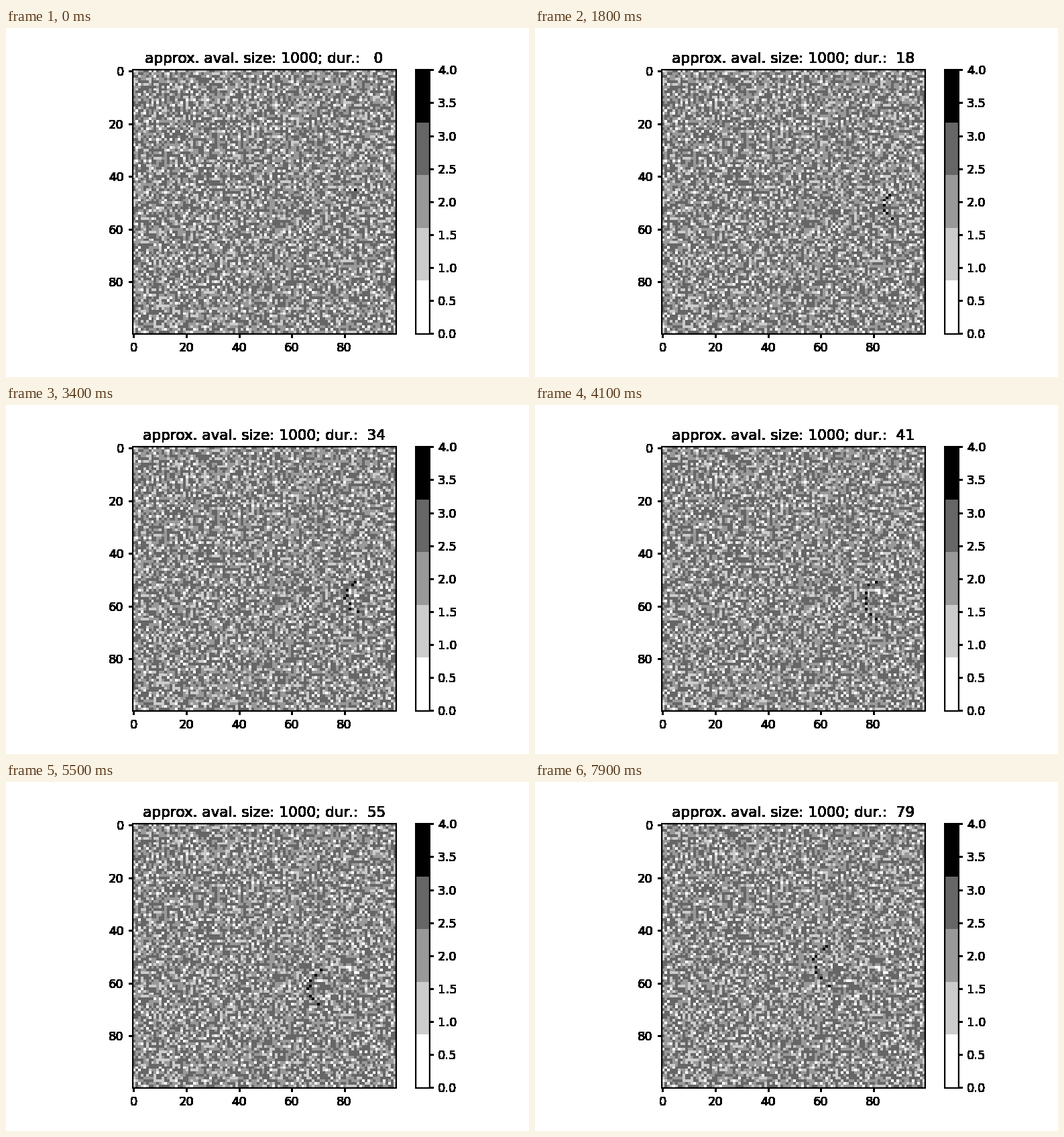
A matplotlib script for the animation above (8 s loop, 780x520 px).

```python
import numpy as np
import matplotlib.pyplot as plt
from matplotlib.animation import FuncAnimation
from matplotlib.colors import ListedColormap
from matplotlib.patches import Rectangle

SIZE, STEPS, DPI = 100, 80, 130
WALKERS = 8
rng = np.random.default_rng(12)


def spread(sites):
    """Grains each cell receives from its toppling neighbours."""
    p = np.pad(sites.astype(int), 1)
    return p[:-2, 1:-1] + p[2:, 1:-1] + p[1:-1, :-2] + p[1:-1, 2:]


def critical_pile():
    pile = rng.integers(1, 6, (SIZE, SIZE))
    while (hot := pile > 3).any():
        pile += spread(hot) - 4 * hot
    return pile


def front(t, u):
    """Point u in [-1, 1] along the bowed wave front at step t."""
    keys = [0, 11, 26, 41, 55, 66, 79]
    x = np.interp(t, keys, [84, 82, 86, 76, 66, 62, 57])
    y = np.interp(t, keys, [45, 48, 55, 58, 62, 60, 53])
    half = np.interp(t, keys, [0, 4, 5, 7, 6, 8, 8])
    return x + 0.65 * half * u * u, y + half * u


def step(pos, goal):
    """One lattice step towards goal, slightly jittered."""
    x, y = pos
    near = [(x + 1, y), (x - 1, y), (x, y + 1), (x, y - 1)]
    return min(near, key=lambda p: np.hypot(p[0] - goal[0], p[1] - goal[1])
               + 0.8 * rng.random())


def avalanche():
    pile, frames = critical_pile(), []
    stock = pile.ravel().copy()
    walkers = [(84, 45)] * WALKERS
    lanes = np.linspace(-1, 1, WALKERS)
    for t in range(STEPS):
        if t:
            walkers = [step(p, front(t, u)) for p, u in zip(walkers, lanes)]
        x, y = np.transpose(walkers)
        frame = pile.copy()
        frame[y, x] = 4
        frames.append(frame)
        pile[y, x] = rng.choice(stock, WALKERS)
    return frames


def crisp(img, dpi):
    """Hard-edged ink: every touched pixel becomes solid."""
    img[..., 3] = img[..., 3] > 0
    return img, 0, 0


frames = avalanche()
plt.rcParams["font.family"] = "DejaVu Sans"
fig, ax = plt.subplots(figsize=(6, 4), dpi=DPI, facecolor="white")
fig.subplots_adjust(left=0.125, right=0.9, bottom=0.125, top=0.88)
cmap = ListedColormap(["#ffffff", "#cccccc", "#999999", "#666666", "#000000"])
image = ax.imshow(frames[0], cmap=cmap, vmin=0, vmax=4,
                  interpolation="nearest")
bar = fig.colorbar(image, ax=ax, ticks=np.arange(0, 4.1, 0.5))
ax.set_xticks(range(0, SIZE, 20))
ax.set_yticks(range(0, SIZE, 20))
title = ax.set_title("")

for art in (ax.xaxis, ax.yaxis, bar.ax.yaxis, title):
    art.set_agg_filter(crisp)

# Solid outer edge under each axes frame
fig.draw_without_rendering()
for box in (ax.get_position(), bar.ax.get_position()):
    fig.add_artist(Rectangle(box.p0, box.width, box.height, fill=False,
                             lw=3 * 72 / DPI, ec="black", zorder=-1,
                             transform=fig.transFigure))


def update(i):
    image.set_data(frames[i])
    title.set_text(f"approx. aval. size: 1000; dur.: {i:3d}")
    return image, title


anim = FuncAnimation(fig, update, frames=STEPS, interval=100, repeat=True)
plt.show()
```
